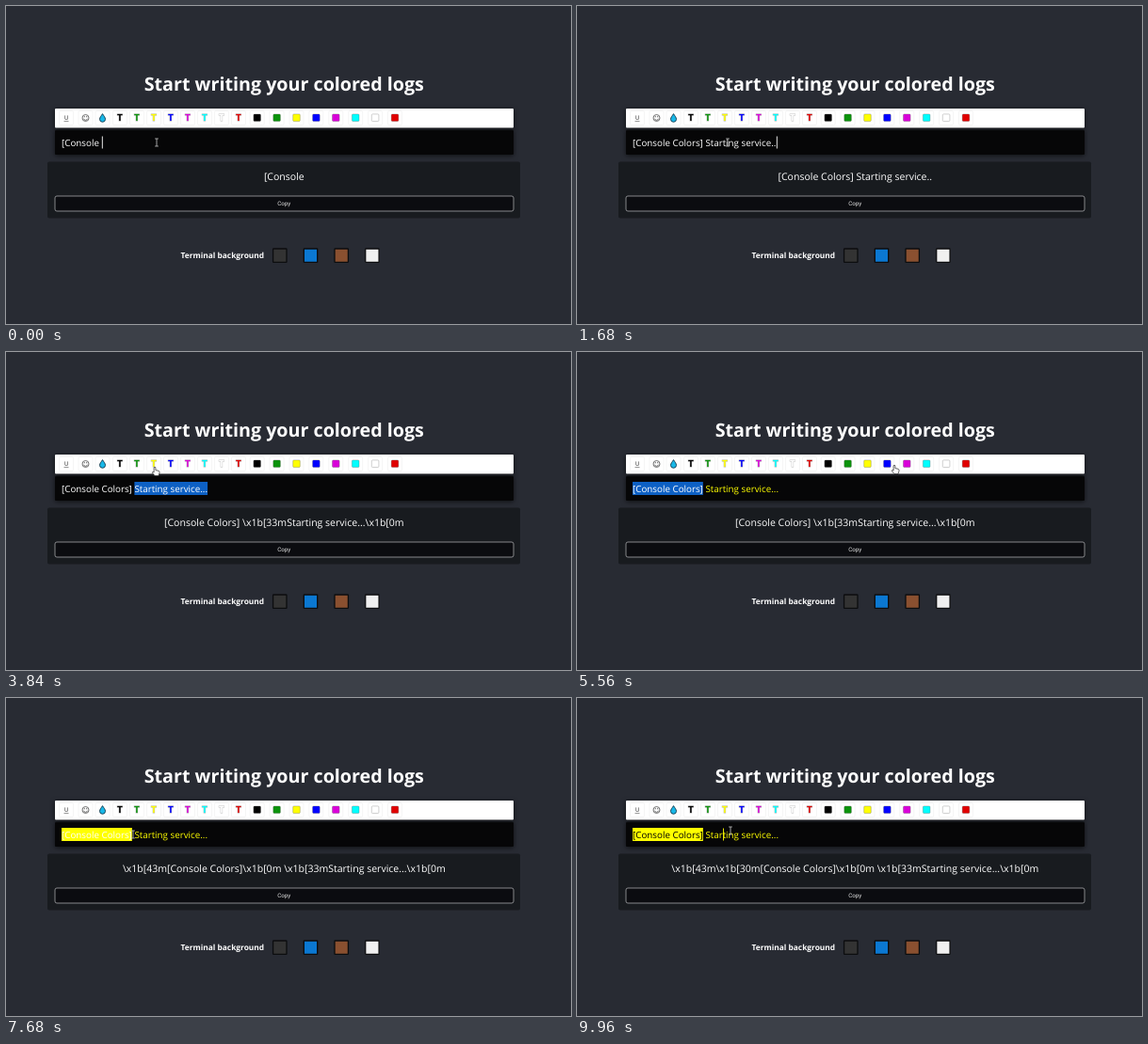
Animation, 600 px wide and 338 px high, one loop 10000 ms. Source, as an HTML page with a canvas:

```html
<!DOCTYPE html>
<html lang="en">
<head>
<meta charset="utf-8">
<title>Colored logs</title>
<style>
  html, body { margin: 0; width: 100%; height: 100%; overflow: hidden; background: #282b33; }
  canvas { display: block; width: 600px; height: 338px; }
</style>
</head>
<body>
<canvas></canvas>
<script>
const W = 600, H = 338, LOOP = 10000, STEP = 40;
const canvas = document.querySelector('canvas');
const ctx = canvas.getContext('2d');
const dpr = window.devicePixelRatio || 1;
canvas.width = Math.round(W * dpr);
canvas.height = Math.round(H * dpr);

const SANS = '"Open Sans", "Noto Sans", sans-serif';
const EDITOR_FONT = `9.8px ${SANS}`;
const OUTPUT_FONT = `10.52px ${SANS}`;
const TAG = '[Console Colors]';
const BODY = 'Starting service...';
const LINE = `${TAG} ${BODY}`;
const TEXT_X = 59, BASELINE = 149;
const PALETTE = ['#000', '#0b930b', '#ff0', '#00f', '#d900d9', '#0ff', '#fff', '#e00000'];
const TERMINALS = ['#333', '#0b78d2', '#8a5030', '#f0f0f0'];

const BODY_COLORED = 3640, TAG_FILLED = 6000, TAG_COLORED = 8840;

// Pointer stops: time, x, y
const PATH = [
  [0, 160, 145], [1700, 160, 145], [1920, 214, 146], [2300, 137, 146],
  [2680, 306, 121], [2860, 307, 121], [3460, 158, 122], [3900, 158, 122],
  [4240, 214, 145], [4600, 214, 145], [4740, 135, 145], [5140, 58, 145],
  [5520, 337, 120], [5640, 337, 120], [5880, 308, 120], [6360, 308, 120],
  [6900, 135, 145], [7720, 135, 145], [8160, 58, 145], [8640, 121, 119],
  [9400, 121, 121], [9720, 163, 141], [10000, 163, 141]
];

// Drag start, drag end, cleared, anchor index, focus index
const SELECTIONS = [
  [1920, 2300, 4440, LINE.length, 17],
  [4740, 5140, 7000, 16, 0],
  [7720, 8160, 9640, 16, 0]
];

// Shown from, shown until, text index
const CARETS = [[1638, 1920, 35], [4440, 4740, 35], [7000, 7720, 16], [9640, LOOP, 21]];

function box(x, y, w, h, fill, radius = 0, stroke, line = 0.7) {
  ctx.beginPath();
  ctx.roundRect(x, y, w, h, radius);
  if (fill) { ctx.fillStyle = fill; ctx.fill(); }
  if (stroke) { ctx.strokeStyle = stroke; ctx.lineWidth = line; ctx.stroke(); }
}

function label(str, x, y, font, color = '#fff', align = 'left') {
  ctx.font = font;
  ctx.fillStyle = color;
  ctx.textAlign = align;
  ctx.fillText(str, x, y);
}

function stroke(color, width, draw) {
  ctx.beginPath();
  draw();
  ctx.strokeStyle = color;
  ctx.lineWidth = width;
  ctx.stroke();
}

function shadowed(draw) {
  ctx.save();
  ctx.shadowColor = 'rgba(0,0,0,.65)';
  ctx.shadowBlur = 5 * dpr;
  ctx.shadowOffsetY = dpr;
  draw();
  ctx.restore();
}

function charX(index) {
  ctx.font = EDITOR_FONT;
  return TEXT_X + ctx.measureText(LINE.slice(0, index)).width;
}

function drawToolbar() {
  shadowed(() => box(52, 109, 487, 20.5, '#fff', 1));
  const cell = x => box(x - 7.5, 111.5, 15, 15, null, 1.5, '#efefef', 0.6);

  [64, 84.5, 102.5].forEach(cell);
  label('U', 64, 121, '6.5px Roboto, sans-serif', '#444', 'center');
  stroke('#555', 0.6, () => { ctx.moveTo(61.5, 122.5); ctx.lineTo(66.5, 122.5); });

  stroke('#444', 0.75, () => {
    ctx.arc(84.5, 119, 3.5, 0, Math.PI * 2);
    ctx.moveTo(86.3, 119.8);
    ctx.arc(84.5, 119.6, 1.8, 0.1, Math.PI - 0.1);
  });
  box(82.8, 117.3, 1, 1, '#333');
  box(85.2, 117.3, 1, 1, '#333');

  ctx.beginPath();
  ctx.moveTo(102.5, 114.6);
  ctx.bezierCurveTo(104, 117, 105.5, 118.5, 105.5, 120.3);
  ctx.arc(102.5, 120.3, 3, 0, Math.PI);
  ctx.bezierCurveTo(99.5, 118.5, 101, 117, 102.5, 114.6);
  ctx.fillStyle = '#18b8e8';
  ctx.fill();
  ctx.strokeStyle = '#17384a';
  ctx.lineWidth = 0.9;
  ctx.stroke();

  PALETTE.forEach((color, i) => {
    const tx = 121 + i * 18, sx = 266.7 + i * 20.9;
    cell(tx);
    ctx.font = `700 10px ${SANS}`;
    ctx.textAlign = 'center';
    ctx.lineWidth = 0.9;
    ctx.strokeStyle = color === '#fff' ? '#bbb' : 'rgba(70,70,70,.45)';
    ctx.strokeText('T', tx, 122.4);
    label('T', tx, 122.4, `700 10px ${SANS}`, color, 'center');
    cell(sx);
    box(sx - 3.8, 114.9, 7.6, 7.6, color, 1, color === '#fff' ? '#bbb' : 'rgba(70,70,70,.4)');
  });
}

function drawPage(output) {
  box(0, 0, W, H, '#282b33');
  label('Start writing your colored logs', 295.3, 89.5, `700 19.7px ${SANS}`, '#fff', 'center');

  box(44, 165.5, 502, 60, '#181b1f', 2);
  label(output, 295.3, 185, OUTPUT_FONT, '#fff', 'center');
  box(52, 202, 487, 16, '#0b0c10', 2, '#a4a5a8', 0.8);
  label('Copy', 295.2, 212.2, '6.2px Roboto, sans-serif', '#e4e4e4', 'center');

  label('Terminal background', 185.5, 268.2, `700 8.37px ${SANS}`);
  TERMINALS.forEach((color, i) =>
    box(283.6 + i * 32.7, 258, 14.4, 14.4, color, 0.5, '#0c0d0f', 1.3));
}

function selectionAt(t) {
  const hit = SELECTIONS.find(([start, , clear]) => t > start && t < clear);
  if (!hit) return null;
  const [start, end, , anchor, focus] = hit;
  const moved = anchor + (focus - anchor) * ease((t - start) / (end - start));
  return [Math.round(moved), anchor];
}

function drawEditor(t, typed) {
  shadowed(() => box(52, 132, 487, 26, '#060607', 1));

  if (t >= TAG_FILLED) box(TEXT_X, 138, charX(16) - TEXT_X, 14, '#ff0');
  const tagColor = t >= TAG_COLORED ? '#000' : '#fff';
  label(typed.slice(0, 16), TEXT_X, BASELINE, EDITOR_FONT, tagColor);
  if (typed.length > 17) {
    label(typed.slice(17), charX(17), BASELINE, EDITOR_FONT, t >= BODY_COLORED ? '#ff0' : '#fff');
  }

  const range = selectionAt(t);
  if (range) {
    const [left, right] = range.map(charX);
    ctx.save();
    box(left, 138, right - left, 14, '#0d60c4');
    ctx.clip();
    label(LINE, TEXT_X, BASELINE, EDITOR_FONT);
    ctx.restore();
  }

  const caret = CARETS.find(([from, until]) => t >= from && t < until);
  const typing = typed.length < LINE.length;
  if (typing || (caret && (t - caret[0]) % 1000 < 500)) {
    const x = charX(typing ? typed.length : caret[2]);
    box(x + 0.4, 138.5, 0.9, 13, t > BODY_COLORED ? '#ff0' : '#fff');
  }
}

function ease(p) {
  p = Math.min(1, Math.max(0, p));
  return p * p * (3 - 2 * p);
}

function pointerAt(t) {
  const i = PATH.findIndex(stop => stop[0] > t);
  const [t0, x0, y0] = PATH[i - 1], [t1, x1, y1] = PATH[i];
  const p = ease((t - t0) / (t1 - t0));
  return [x0 + (x1 - x0) * p, y0 + (y1 - y0) * p];
}

function drawPointer(x, y) {
  ctx.save();
  ctx.translate(x, y);
  if (y > 130) {
    stroke('#c8c8c8', 0.8, () => {
      ctx.moveTo(-1.8, -4); ctx.lineTo(1.8, -4);
      ctx.moveTo(0, -4); ctx.lineTo(0, 4);
      ctx.moveTo(-1.8, 4); ctx.lineTo(1.8, 4);
    });
  } else {
    ctx.beginPath();
    ctx.moveTo(-0.9, 6);
    ctx.lineTo(-0.9, 0.8);
    ctx.quadraticCurveTo(0, -0.6, 0.9, 0.8);
    ctx.lineTo(0.9, 3.6);
    ctx.lineTo(4.2, 4.3);
    ctx.quadraticCurveTo(5.2, 4.8, 5, 6.4);
    ctx.lineTo(4, 9.6);
    ctx.lineTo(0, 9.6);
    ctx.lineTo(-2.8, 6.2);
    ctx.quadraticCurveTo(-2.6, 4.8, -0.9, 6);
    ctx.closePath();
    ctx.fillStyle = '#fff';
    ctx.fill();
    ctx.strokeStyle = '#222';
    ctx.lineWidth = 0.7;
    ctx.stroke();
  }
  ctx.restore();
}

function outputAt(t, typed) {
  if (t < BODY_COLORED) return typed.trim();
  const reset = '\\x1b[0m';
  const body = `\\x1b[33m${BODY}${reset}`;
  if (t < TAG_FILLED) return `${TAG} ${body}`;
  const ink = t < TAG_COLORED ? '' : '\\x1b[30m';
  return `\\x1b[43m${ink}${TAG}${reset} ${body}`;
}

function render(now) {
  const t = Math.floor((now % LOOP) / STEP) * STEP;
  const typed = LINE.slice(0, 9 + Math.floor(t / 63));
  ctx.setTransform(dpr, 0, 0, dpr, 0, 0);
  ctx.textRendering = 'geometricPrecision';
  drawPage(outputAt(t, typed));
  drawToolbar();
  drawEditor(t, typed);
  drawPointer(...pointerAt(t));
}

let begin;
function tick(now) {
  begin ??= now;
  render(now - begin);
  requestAnimationFrame(tick);
}
render(0);
requestAnimationFrame(tick);
</script>
</body>
</html>
```
